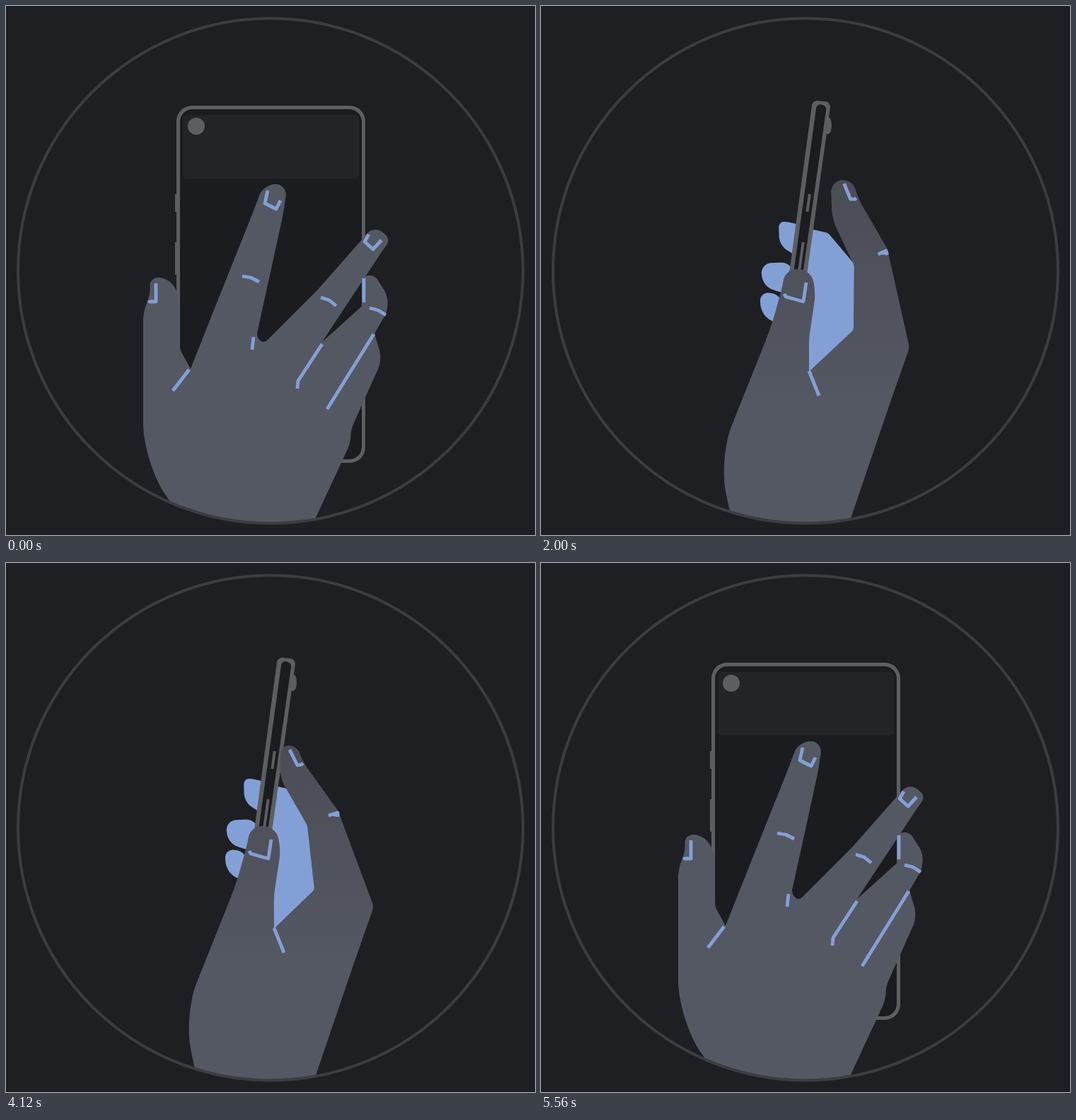
Write an HTML page with a canvas that moves like this. It is 748x748 px and loops after 5600 ms.

```html
<!DOCTYPE html>
<html lang="en">
<head>
<meta charset="utf-8">
<title>Tap the back of the phone</title>
<style>
  html, body { margin: 0; width: 100%; height: 100%; overflow: hidden; background: #1e1f23; }
  canvas { display: block; width: 100vw; height: 100vh; }
</style>
</head>
<body>
<canvas id="stage" width="748" height="748"></canvas>
<script>
const ctx = document.getElementById('stage').getContext('2d');
const LOOP = 5600;
const BG = '#1e1f23', BODY = '#1b1c20', FRAME = '#5d5e61', RING = '#3c3d40', BLUE = '#83a0d6';

// Turn of the phone: 0 is the back view, 1 is the side view.
const KNOTS = [0, 0.385, 0.655, 1];

const mix = (a, b, k) => a + (b - a) * k;
const mixAll = (a, b, k) => a.map((v, i) => mix(v, b[i], k));
const clamp = v => Math.min(1, Math.max(0, v));

// n points spread evenly along a line
const along = (x1, y1, x2, y2, n) => Array.from({ length: n }, (_, i) =>
  [mix(x1, x2, i / (n - 1)), mix(y1, y2, i / (n - 1))]).flat();

function bezier(x1, x2) {
  return x => {
    let lo = 0, hi = 1, s = 0.5;
    for (let i = 0; i < 24; i++) {
      s = (lo + hi) / 2;
      const at = 3 * (1 - s) * (1 - s) * s * x1 + 3 * (1 - s) * s * s * x2 + s * s * s;
      if (at < x) lo = s; else hi = s;
    }
    return 3 * s * s - 2 * s * s * s;
  };
}
const turnIn = bezier(0.27, 0.08), turnOut = bezier(0.3, 0.7);

// Blend four poses by the turn
function pose(poses, u) {
  const i = u < KNOTS[1] ? 0 : u < KNOTS[2] ? 1 : 2;
  return mixAll(poses[i], poses[i + 1], (u - KNOTS[i]) / (KNOTS[i + 1] - KNOTS[i]));
}

// Closed polygon; cut is how far each corner is rounded
function fillShape(p, cut, color) {
  const n = p.length / 2;
  const pt = i => [p[2 * ((i + n) % n)], p[2 * ((i + n) % n) + 1]];
  ctx.beginPath();
  for (let i = 0; i < n; i++) {
    const [x, y] = pt(i), [ax, ay] = pt(i - 1), [bx, by] = pt(i + 1);
    const la = Math.hypot(ax - x, ay - y) || 1, lb = Math.hypot(bx - x, by - y) || 1;
    const r = Math.min(cut[i % cut.length], la / 2, lb / 2);
    const a = [(ax - x) / la * r, (ay - y) / la * r], b = [(bx - x) / lb * r, (by - y) / lb * r];
    ctx.lineTo(x + a[0], y + a[1]);
    ctx.bezierCurveTo(x + a[0] * 0.45, y + a[1] * 0.45, x + b[0] * 0.45, y + b[1] * 0.45, x + b[0], y + b[1]);
  }
  ctx.closePath();
  ctx.fillStyle = color;
  ctx.fill();
}

function stroke(p, width, color) {
  ctx.beginPath();
  for (let i = 0; i < p.length; i += 2) ctx.lineTo(p[i], p[i + 1]);
  ctx.lineWidth = width;
  ctx.strokeStyle = color;
  ctx.stroke();
}

// The hand outline runs thumb, index, other fingers; four poses of each
const THUMB = [
  [258,738, 194,646, 194,432, 204,408, 203,384, 228,384, 245,406, 245,484, 261,513],
  [262,738, 206,654, 208,438, 214,410, 214,374, 240,374, 264,402, 264,460, 291,517],
  [270,738, 222,660, 237,440, 249,408, 250,373, 278,373, 291,394, 298,486, 315,517],
  [272,738, 251,640, 325,455, 340,402, 346,372, 380,372, 389,402, 379,470, 379,517]
];
const THUMB_CUT = [0, 70, 20, 10, 18, 18, 20, 8, 1];

const INDEX = [
  [...along(294,430, 350,290, 3), 364,252, 398,252, 392,294, 371,390],
  [361,422, 375,345, 369,300, 368,258, 400,258, 406,290, 420,372],
  [388,437, 401,358, 380,308, 376,260, 404,260, 411,281, 441,352],
  [436,462, 426,371, 387,303, 389,258, 411,258, 421,283, 470,351]
];
const INDEX_UP = [442,458, 443,367, 412,301, 410,248, 440,244, 450,274, 491,345];

const FINGERS = [
  [354,467, 364,478, 440,402, 521,310, 544,330, 533,345, 447,475, 506,422, 506,382,
   521,380, 541,412, 538,434, 521,463, 532,500, 488,598, 487,618, 428,745],
  [...along(424,424, 424,424, 2), 460,394, 480,318, 490,318, 490,332,
   ...along(498,394, 503,396, 3), 511,400, 514,415, 512,434, 501,457, 517,517,
   472,603, 459,642, 423,745],
  [...along(447,355, 451,338, 3), 454,316, 470,322, 473,340, ...along(480,392, 484,394, 3),
   495,398, 501,412, 499,434, 489,456, 499,510, ...along(481,564, 456,642, 2), 423,745],
  [...along(472,357, 520,486, 14), ...along(494,560, 431,745, 3)]
];
const FINGERS_UP = [...along(492,352, 521,483, 14), ...FINGERS[3].slice(28)];
const FINGERS_CUT = [6, 7, 4, 16, 16, 4, 2, 2, 5, 15, 20, 6, 3, 14, 8, 14, 0];

// Back plate corners, then how far the plate sits inside: left, top, right
const OUTER = [
  [241,141, 508,141, 508,646, 241,646],
  [268,131, 493,154, 468,645, 240,645],
  [314,128, 460,155, 420,645, 268,645],
  [384,133, 410,136, 339,645, 315,645]
];
const INSET = [[5, 5, 5], [13, 5, 3], [16, 6, 3], [6, 5, 6]];
const PLATE = [[22, 0.035], [20, 0.05], [16, 0.085], [8, 0]];   // corner, panel alpha
const CAMERA = [[269,170,12], [299,162,10.5], [340,161,6.5], [406,169,5]];
const BUTTONS = [[266, 291], [334, 380]];

const PALM = [
  [380,315, 406,321, 444,366, 442,462, 379,520, 360,480],
  [336,304, 354,306, 385,316, 385,362, 354,350, 337,337],
  [310,364, 356,362, 360,408, 336,405, 314,395],
  [309,404, 342,408, 340,448, 325,446, 311,432]
];

const NAIL = [
  [370,261, 366,279, 382,287, 388,275],
  [378,267, 382,286, 397,286, 399,279],
  [386,269, 395,285, 406,285, 410,279],
  [401,264, 412,286, 418,285, 420,283]
];
const NAIL_UP = [429,251, 438,273, 444,273, 446,271];
const THUMB_NAIL = [
  [212,392, 212,418, 203,418, 203,416],
  [226,384, 228,409, 218,411, 215,410],
  [266,384, 266,410, 256,410, 251,407],
  [375,391, 371,418, 346,411, 344,407]
];
const KNUCKLE = [
  [334,382, 346,384, 358,390],
  [397,369, 405,370, 413,370],
  [427,363, 435,363, 443,361],
  [456,357, 469,353, 469,359]
];
const KNUCKLE_UP = [477,351, 488,346, 490,352];
const WEB = [[259,514, 236,544], [295,518, 293,544], [315,519, 323,544], [379,516, 393,551]];

// Marks that vanish as the hand turns: a shape, its place and size in the
// first three poses, and the pose at which it is gone
const marks = [];
const mark = (shape, places, gone) => marks.push({ shape, places: [...places, places[2]], gone });
mark([-7,-10, -13,0, -1,11, 11,-2], [[520,333,1], [484,324,0.28], [457,321,0.2]], 3);
mark([-11,-5, 1,-1, 11,7], [[456,417,1], [484,406,1], [484,412,1]], 2);
mark([-12,-5, 0,-2, 11,5], [[526,432,1], [502,434,1], [486,432,1]], 3);
mark([17,-32, -17,20, -18,31], [[430,510,1], [468,500,0.5], [478,490,0.3]], 1);
mark([33,-53, -33,53], [[487,517,1], [488,484,0.5], [489,467,0.22]], 3);
mark([1,-9, -1,9], [[349,477,1], [400,440,0.5], [444,358,0.2]], 1);
mark([0,-17, 0,17], [[506,402,1], [503,402,0.3], [484,398,0.1]], 1);

function turnAt(t) {
  if (t < 4120) return turnIn(clamp((t - 720) / 840));
  return 1 - turnOut(clamp((t - 4120) / 960));
}

// The index finger leaves the phone and comes back in an even beat
function liftAt(t) {
  if (t < 1720 || t > 3280) return 0;
  return (1 - Math.cos((t - 1720) / 520 * 2 * Math.PI)) / 2;
}

function drawPhone(u) {
  const o = pose(OUTER, u);
  const [l, top, r] = pose(INSET, u);
  const [corner, alpha] = pose(PLATE, u);
  const plate = [o[0] + l, o[1] + top, o[2] - r, o[3] + top, o[4] - r, o[5] - 5, o[6] + l, o[7] - 5];
  const left = k => [mix(plate[0], plate[6], k) + 4, mix(plate[1], plate[7], k)];
  const right = k => [mix(plate[2], plate[4], k) - 4, mix(plate[3], plate[5], k)];
  fillShape(o, [corner], FRAME);
  fillShape(plate, [corner * 0.8], BODY);
  fillShape([left(0.016), right(0.016), right(0.198), left(0.198)].flat(), [6], `rgba(255,255,255,${alpha})`);

  const [x, y, rx] = pose(CAMERA, u);
  ctx.beginPath();
  ctx.ellipse(x, y, rx, 12, 0, 0, 2 * Math.PI);
  ctx.fillStyle = FRAME;
  ctx.fill();

  const across = 0.5 * u ** 8 + 0.03 * clamp(u * 4);
  const edge = y => [mix(o[0], o[6], (y - o[1]) / (o[7] - o[1])) + across * (o[2] - o[0]), y];
  BUTTONS.forEach(([a, b]) => stroke([edge(a), edge(b)].flat(), 4, FRAME));
}

function drawMarks(u) {
  for (const { shape, places, gone } of marks) {
    ctx.globalAlpha = clamp((KNOTS[gone] - u) / (KNOTS[gone] - KNOTS[gone - 1]));
    if (ctx.globalAlpha > 0) {
      const [x, y, size] = pose(places, u);
      stroke(shape.map((v, i) => v * size + (i % 2 ? y : x)), 4.8, BLUE);
    }
  }
  ctx.globalAlpha = 1;
}

function drawHand(u, lift) {
  // Only the side view has a lifted finger
  const part = (poses, up) => pose([...poses.slice(0, 3), mixAll(poses[3], up, lift)], u);
  const bend = 3 + 85 * (1 - u) * clamp((1 - u) * 3);
  const shade = ctx.createLinearGradient(0, 250, 0, 570);
  const top = mixAll([84, 88, 99], [75, 77, 85], u);
  shade.addColorStop(0, `rgb(${top.map(Math.round)})`);
  shade.addColorStop(1, 'rgb(84,88,99)');
  fillShape(
    [...pose(THUMB, u), ...part(INDEX, INDEX_UP), ...part(FINGERS, FINGERS_UP)],
    [...THUMB_CUT, bend, bend, 14, 18, 18, 10, 3, ...FINGERS_CUT],
    shade
  );

  stroke(pose(THUMB_NAIL, u), 4.8, BLUE);
  stroke(pose(WEB, u), 4.8, BLUE);
  stroke(part(NAIL, NAIL_UP), 4.8, BLUE);
  stroke(part(KNUCKLE, KNUCKLE_UP), 4.8, BLUE);
  ctx.fillStyle = BLUE;
  ctx.fill();
  drawMarks(u);
}

function ring() {
  ctx.beginPath();
  ctx.arc(374, 374.5, 357, 0, 2 * Math.PI);
}

function draw(t) {
  const u = turnAt(t);
  ctx.fillStyle = BG;
  ctx.fillRect(0, 0, 748, 748);
  ctx.lineJoin = 'round';

  ctx.save();
  ring();
  ctx.clip();
  PALM.forEach((p, i) => fillShape(p, [i ? 17 : 3], BLUE));
  drawPhone(u);
  drawHand(u, liftAt(t));
  ctx.restore();

  ring();
  ctx.lineWidth = 4;
  ctx.strokeStyle = RING;
  ctx.stroke();
}

const start = performance.now();
function tick() {
  draw((performance.now() - start) % LOOP);
  requestAnimationFrame(tick);
}
tick();
</script>
</body>
</html>
```
